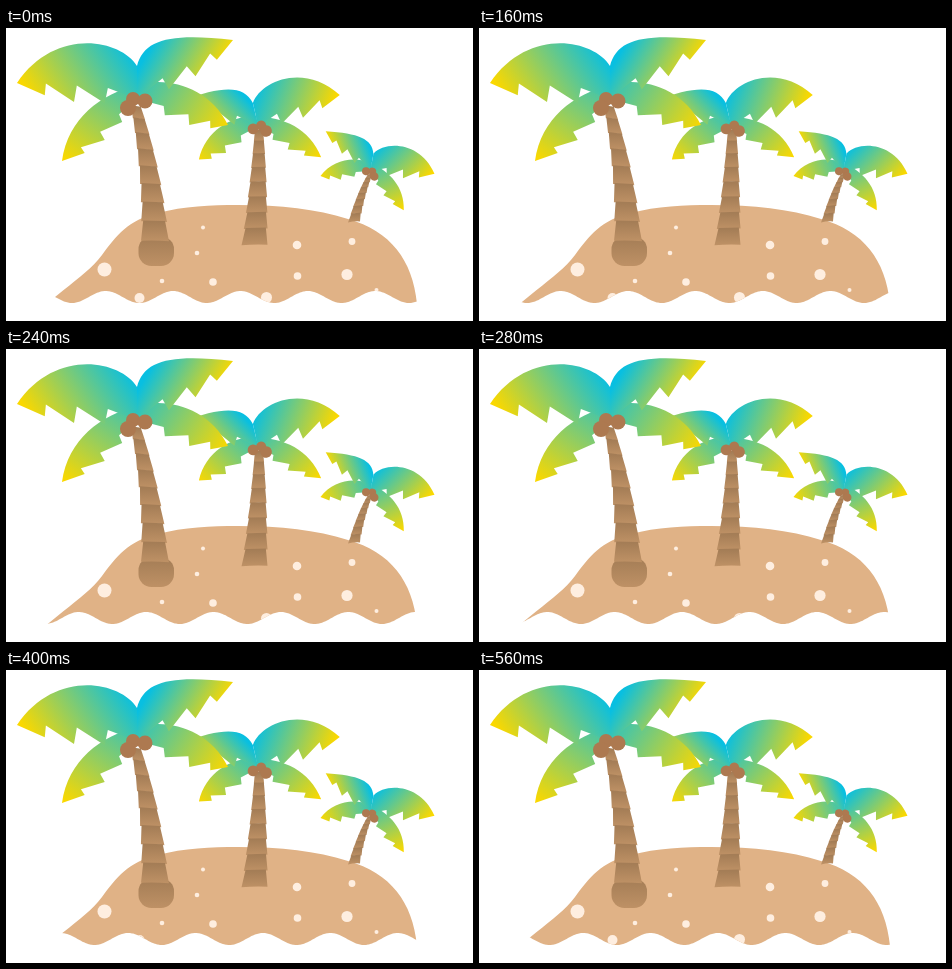
Write an HTML page with a canvas that moves like this. It is 467 px wide and 293 px high and loops after 600 ms.

```html
<!DOCTYPE html>
<html lang="en">
<head>
<meta charset="utf-8">
<title>Palm island</title>
<style>
  html, body { margin: 0; width: 100%; height: 100%; overflow: hidden; background: #fff; }
  canvas { display: block; }
</style>
</head>
<body>
<canvas id="stage" width="467" height="293"></canvas>
<script>
const ctx = document.getElementById('stage').getContext('2d');
const LOOP = 600, STEP = 40, WAVELENGTH = 67.4, TEETH = 4;

const island = new Path2D(`M38 278 L57 262.5 C74 249 86 240 96 227 C110 208 122 192 152 185
  C178 178 205 177 232 177 C275 177 310 181 342 191 C385 203 407 233 411 276 Z`);

// x, y, radius
const spots = [
  [98.5, 241.5, 7], [197, 199.5, 2], [191, 225, 2.3], [156, 253, 2.3], [207, 254, 3.8],
  [133.5, 270, 5], [260.5, 269.5, 5.5], [291, 217, 4.3], [291.5, 248, 3.8],
  [346, 213.5, 3.4], [341, 246.5, 5.6], [370.5, 262, 2]
];

// One crown, shared by all palms: upper edge from root to tip, bulge of the lower edge, gradient axis.
const leaves = [
  { edge: [[0, -18], [29, -27], [72, -17], [91, 22]], bulge: [59, 35], axis: [-6, -40, 91, 22] },
  { edge: [[0, -18], [-36, -9], [-69, 15], [-75, 58]], bulge: [-27, 47], axis: [0, -45, -71, 57] },
  { edge: [[0, -37], [7, -64], [34, -70], [96, -63]], bulge: [69, -20], axis: [19, -65, 79, -30] },
  { edge: [[0, -37], [-18, -65], [-83, -75], [-120, -20]], bulge: [-66, 10], axis: [-13, -60, -101, 0] }
];
const nuts = [[-4, -4, 7], [8, -2, 7.5], [-9, 5, 8]];

// Trunks run along a curve from top to base, widening from thin to thick.
const palms = [
  { x: 364, y: 145, size: 0.53, flip: -1, turn: 0.175, trunk: [[364, 147], [355, 165], [348, 194]], thin: 2.5, thick: 6 },
  { x: 253, y: 101, size: 0.72, flip: -1, turn: -0.232, trunk: [[253, 103], [253, 160], [248.5, 217]], thin: 4, thick: 13 },
  { x: 131, y: 75, size: 1, flip: 1, turn: 0, trunk: [[130, 79], [147, 145], [149, 213]], thin: 5, thick: 14 }
];

const mix = (a, b, t) => a.map((v, i) => v + (b[i] - v) * t);

function bezier(points, t) {
  if (points.length === 1) return points[0];
  return bezier(points.slice(1).map((p, i) => mix(points[i], p, t)), t);
}

function gradient(x1, y1, x2, y2, from, to) {
  const fill = ctx.createLinearGradient(x1, y1, x2, y2);
  fill.addColorStop(0, from);
  fill.addColorStop(1, to);
  return fill;
}

const bark = (top, bottom) => gradient(0, top, 0, bottom, '#a47d56', '#be9165');

function dot([x, y, r], color) {
  ctx.fillStyle = color;
  ctx.beginPath();
  ctx.arc(x, y, r, 0, Math.PI * 2);
  ctx.fill();
}

function drawLeaf({ edge, bulge, axis }) {
  const [root, bendA, bendB, tip] = edge;
  const lower = [tip, bulge, [0, -4]];
  ctx.beginPath();
  ctx.moveTo(...root);
  ctx.bezierCurveTo(...bendA, ...bendB, ...tip);
  for (let i = 1; i < TEETH; i++) {
    const t = i / TEETH, tooth = bezier(lower, t);
    ctx.lineTo(...tooth);
    ctx.lineTo(...mix(tooth, bezier(edge, 1 - t), 0.28));
  }
  ctx.lineTo(...lower[2]);
  ctx.fillStyle = gradient(...axis, '#08bfe1', '#fad800');
  ctx.fill();
}

function drawTrunk({ trunk, thin, thick }) {
  const count = 8, at = i => bezier(trunk, (i / count) ** 1.15);
  for (let i = 0; i < count; i++) {
    const [x1, y1] = at(i), [x2, y2] = at(i + 1);
    const width = thin + (thick - thin) * (i + 1) / count;
    const top = width * 0.78, tilt = (x1 - x2) * 0.25;
    ctx.fillStyle = bark(y1, y2);
    ctx.beginPath();
    ctx.moveTo(x1 - top, y1 - 1 + tilt);
    ctx.lineTo(x1 + top, y1 - 1 - tilt);
    ctx.lineTo(x2 + width, y2 - tilt);
    ctx.quadraticCurveTo(x2, y2 - 1, x2 - width, y2 + tilt);
    ctx.fill();
  }
}

function inCrown({ x, y, size, flip, turn }, draw) {
  ctx.save();
  ctx.translate(x, y);
  ctx.rotate(turn);
  ctx.scale(size * flip, size);
  draw();
  ctx.restore();
}

function drawPalm(palm) {
  inCrown(palm, () => leaves.forEach(drawLeaf));
  drawTrunk(palm);
  inCrown(palm, () => nuts.forEach(nut => dot(nut, '#ad7950')));
}

function drawIsland(progress) {
  const trough = 66 - WAVELENGTH * progress;
  ctx.save();
  ctx.beginPath();
  ctx.moveTo(0, 0);
  for (let x = 0; x <= 467; x++) {
    ctx.lineTo(x, 269 + 6 * Math.cos((x - trough) / WAVELENGTH * Math.PI * 2));
  }
  ctx.lineTo(467, 0);
  ctx.clip();
  ctx.fillStyle = '#e0b286';
  ctx.fill(island);
  spots.forEach(spot => dot(spot, '#feeee0'));
  ctx.restore();
}

function drawStump() {
  ctx.fillStyle = bark(209, 238);
  ctx.beginPath();
  ctx.roundRect(132.5, 209, 35.5, 29, [12, 12, 13, 13]);
  ctx.fill();
}

function render(now) {
  const time = Math.floor(now % LOOP / STEP) * STEP;
  ctx.clearRect(0, 0, 467, 293);
  drawIsland(time / LOOP);
  drawStump();
  palms.forEach(drawPalm);
  requestAnimationFrame(render);
}
render(0);
</script>
</body>
</html>
```
